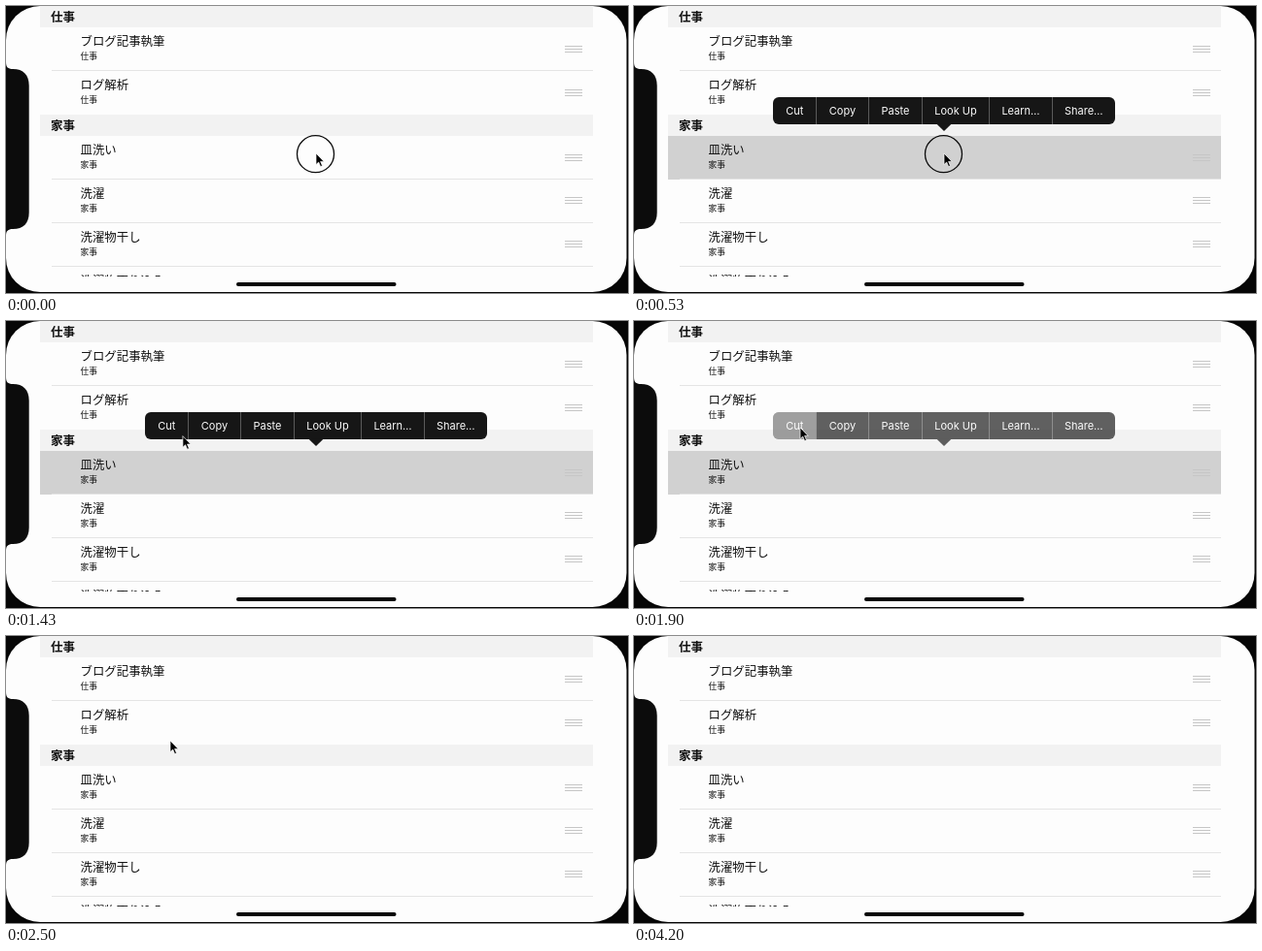
An HTML page for the animation above (4.23 s loop, 640 by 296 pixels).

```html
<!DOCTYPE html>
<html lang="ja">
<head>
<meta charset="utf-8">
<style>
  html, body { margin: 0; height: 100%; overflow: hidden; background: #060606; }
  svg { display: block; width: 640px; height: 296px; }
  text { font-family: "Noto Sans CJK JP", "Noto Sans CJK", sans-serif; fill: #101010; }
  .head { font-size: 12.5px; font-weight: 700; }
  .title { font-size: 12.4px; }
  .sub { font-size: 8.7px; }
  .item { font: 11px Inter, sans-serif; fill: #fdfdfd; text-anchor: middle; }
</style>
</head>
<body>
<svg viewBox="0 0 640 296">
  <defs>
    <clipPath id="view"><rect width="640" height="279"/></clipPath>
    <clipPath id="bar"><rect x="143" y="94" width="352" height="28" rx="6"/></clipPath>
  </defs>
  <rect width="640" height="296" fill="#060606"/>
  <rect width="638.5" height="295" rx="35" fill="#fdfdfd"/>
  <path d="M0 58C0 63 2 65 7 65C18 65 23.7 71 23.7 82V213C23.7 224 18 230 7 230C2 230 0 232 0 237Z" fill="#0c0c0c"/>
  <rect id="chosen" x="35" y="134" width="569" height="45" fill="#d1d1d1"/>
  <g id="list" clip-path="url(#view)"></g>
  <rect x="237" y="285" width="164.5" height="4" rx="2" fill="#040404"/>
  <g id="menu">
    <g clip-path="url(#bar)">
      <rect x="143" y="94" width="352" height="28" fill="#161616"/>
      <rect id="cut" x="143" y="94" width="44.5" height="28" fill="#fff"/>
      <g id="items"></g>
    </g>
    <path d="M311.5 121.8H326.5L319 129Z" fill="#161616"/>
  </g>
  <g id="pointer">
    <circle id="touch" cx="-.5" cy=".7" r="19" fill="none" stroke="#0c0c0c" stroke-width="1.3"/>
    <path d="M0 0V11.6L2.7 9.1L4.6 13.6L6.5 12.8L4.6 8.4H8.2Z" fill="#000" stroke="#fdfdfd" stroke-width=".7"/>
  </g>
</svg>
<script>
const $ = id => document.getElementById(id);
const text = (cls, x, y, s) => `<text class="${cls}" x="${x}" y="${y}">${s}</text>`;

const header = (y, s) =>
  `<rect x="35" y="${y}" width="569" height="22" fill="#f2f2f2"/>` + text('head', 46, y + 16.4, s);

function row(y, title, sub, line = true) {
  const grip = [19.5, 22.5, 25.5].map(d => `M575 ${Math.floor(y) + d}h18`).join('');
  return text('title', 76.6, y + 19.2, title) + text('sub', 76.6, y + 33.4, sub) +
    `<path d="${grip}" stroke="#c6c6c6"/>` +
    (line ? `<path d="M47 ${Math.floor(y + 44.8) + .5}H604" stroke="#e4e4e4"/>` : '');
}

const home = ['皿洗い', '洗濯', '洗濯物干し', '洗濯物取り込み'];
$('list').innerHTML = header(0, '仕事') +
  row(22, 'ブログ記事執筆', '仕事') + row(67, 'ログ解析', '仕事', false) +
  header(112, '家事') + home.map((s, i) => row(134 + i * 44.8, s, '家事')).join('');

const labels = ['Cut', 'Copy', 'Paste', 'Look Up', 'Learn…', 'Share…'];
const edges = [143, 187.5, 241.5, 296.5, 365.5, 430.5, 495];
$('items').innerHTML = labels.map((s, i) =>
  text('item', (edges[i] + edges[i + 1]) / 2, 111.8, s) +
  (i ? `<path d="M${edges[i]} 94v28" stroke="#6c6c6c" stroke-width=".8"/>` : '')).join('');

const ramp = (t, a, b) => Math.min(1, Math.max(0, (t - a) / (b - a)));
const ease = p => p < .5 ? 2 * p * p : 1 - 2 * (1 - p) ** 2;
const within = (t, a, b) => t >= a && t < b;
const fade = (id, v) => $(id).setAttribute('opacity', v);

function draw(t) {
  const go = ease(ramp(t, 720, 1600)), lift = ramp(t, 1430, 1600);
  const nudge = ramp(t, 2460, 2500), back = ease(ramp(t, 2760, 2930));
  const x = 319 - 148 * go - 2 * nudge + 2 * back;
  const y = 152 - 36 * go - 6 * lift - 2 * nudge + 3 * back;
  $('pointer').setAttribute('transform', `translate(${x} ${y})`);
  fade('pointer', 1 - ramp(t, 3110, 3430));
  fade('touch', +(t < 700 || within(t, 1670, 1790)));
  fade('chosen', +within(t, 80, 2080));
  fade('menu', ramp(t, 390, 480) * (1 - ease(ramp(t, 1780, 2080))));
  fade('cut', t >= 1690 ? .4 : 0);
}

const start = performance.now();
function tick() {
  draw((performance.now() - start) % 4230);
  requestAnimationFrame(tick);
}
tick();
</script>
</body>
</html>
```
